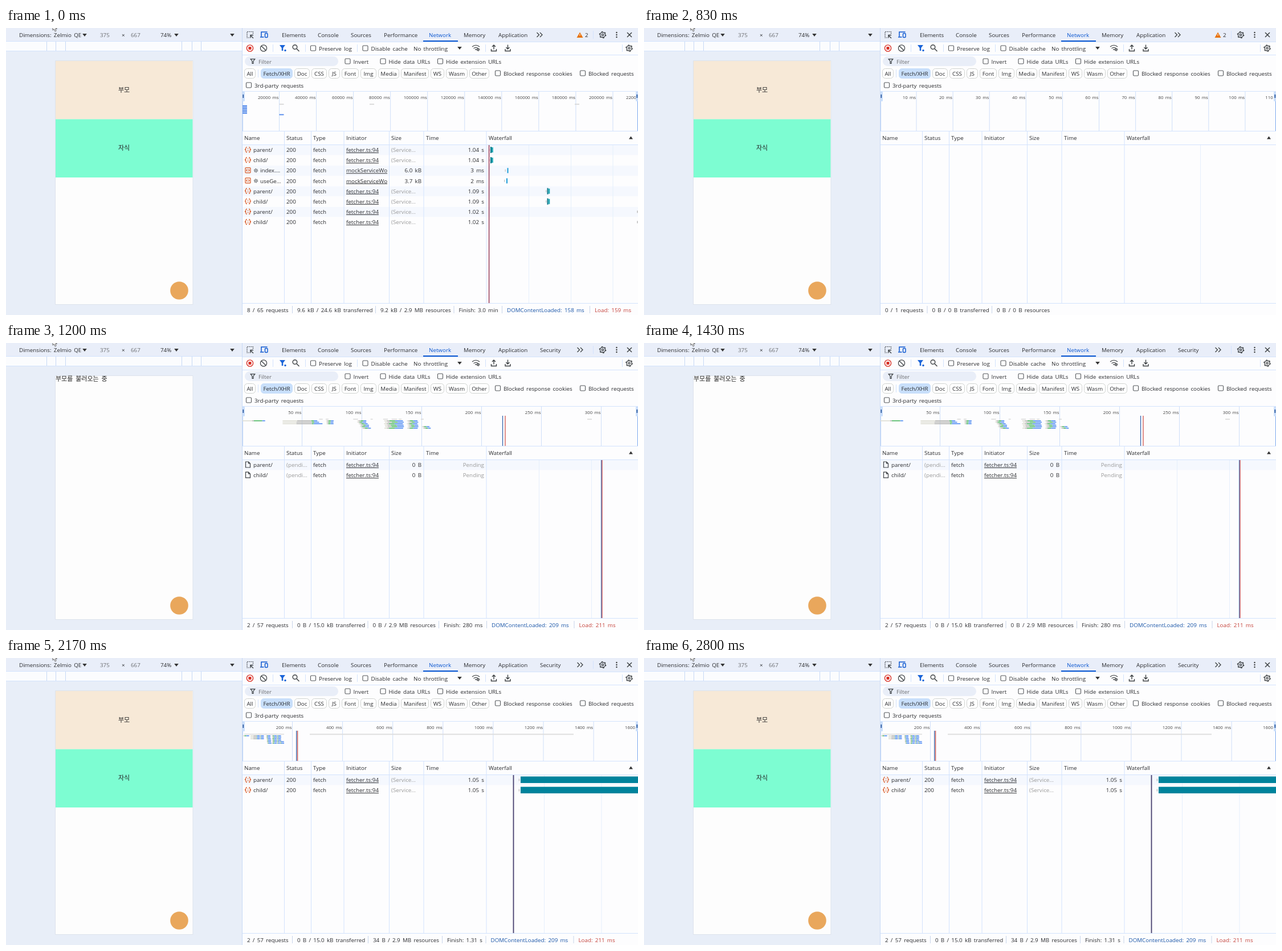
An HTML page for the animation above (2.87 s loop, 1109 by 505 pixels).

```html
<!DOCTYPE html>
<html lang="ko">
<head>
<meta charset="utf-8">
<title>Network panel reload</title>
<style>
  html, body { margin: 0; width: 100%; height: 100%; overflow: hidden; background: #fdfdfe; }
  svg { display: block; }
  text { font: 9.8px "Open Sans", "Noto Sans CJK KR", "Noto Sans CJK", sans-serif; word-spacing: 1.7px; fill: #2b2c2f; white-space: pre; }
  .ko { font: 11px "Noto Sans CJK KR", "Noto Sans CJK", sans-serif; fill: #222; }
  .tick { font-size: 7.8px; word-spacing: 1.3px; fill: #444; }
  .dim { fill: #9a9a9a; }
  .mid { fill: #6b6d70; }
  .blue { fill: #0b57d0; }
  .dcl { fill: #1a56a8; }
  .load { fill: #c5423a; }
  .link { text-decoration: underline; }
  .ic { fill: none; stroke: #3c4043; stroke-width: 1.2; }
</style>
</head>
<body>
<svg id="stage" width="1109" height="505" viewBox="0 0 1109 505"></svg>
<script>
const LOOP = 2870;
const EDGE = '#d3e3fd', BAR = '#e9eef9', TEAL = '#00839c';

const rect = (x, y, w, h, fill, extra = '') =>
  `<rect x="${x}" y="${y}" width="${w}" height="${h}" fill="${fill}" ${extra}/>`;
const vline = (x, y1, y2, color = EDGE, w = 1) => rect(x - w / 2, y1, w, y2 - y1, color);
const hline = (x1, x2, y, color = EDGE) => rect(x1, y, x2 - x1, 1, color);
// y is the middle of the text line
const text = (x, y, s, cls = '', extra = '') =>
  `<text x="${x}" y="${y + 3.6}" class="${cls}" ${extra}>${s}</text>`;
const endText = (x, y, s, cls) => text(x, y, s, cls, 'text-anchor="end"');
const midText = (x, y, s, cls) => text(x, y, s, cls, 'text-anchor="middle"');
const path = (d, extra = '') => `<path class="ic" d="${d}" ${extra}/>`;
const solid = (d, fill = '#333') => `<path d="${d}" fill="${fill}"/>`;
const caret = (x, y) => solid(`M${x - 3.8} ${y - 2.5}h7.6l-3.8 5z`);
const each = (list, fn) => list.map(fn).join('');

function check(x, y, label) {
  return rect(x - 4.5, y - 4.5, 9, 9, '#fff', 'rx="1.5" stroke="#55585c" stroke-width="1.1"') +
    text(x + 10, y + .5, label);
}

function gear(x, y, r, w = 1.3) {
  return `<g class="ic" style="stroke-width:${w}">
    <circle cx="${x}" cy="${y}" r="${r * .75}"/><circle cx="${x}" cy="${y}" r="${r * .28}"/>
    <circle cx="${x}" cy="${y}" r="${r * .95}" stroke-dasharray="${r * .4} ${r * .595}"/></g>`;
}

const funnel = (x, y, r) => `M${x - r} ${y - r}h${2 * r}l${-r * .75} ${r}v${r}h${-r * .5}v${-r}z`;

function devicePane() {
  return rect(0, 0, 414, 505, '#e8eef8') + rect(0, 0, 414, 23, BAR) +
    rect(0, 23, 414, 17, '#fbfcfe') + hline(0, 414, 23) + hline(0, 414, 40) +
    each([71.5, 87.5, 104.5, 308.5, 326.5, 342.5], x => vline(x, 24, 40, '#c6d8f5')) +
    text(23, 12.5, 'Dimensions: Zelmio QE') + caret(138, 12.5) +
    text(165, 12.5, '375', 'mid') + text(203, 12.5, '×') + text(219, 12.5, '667', 'mid') +
    text(271, 12.5, '74%') + caret(299, 12.5) + caret(397, 12.5) +
    '<path d="M82 -6V4l2.3-2 1.8 4 2-1-1.8-3.600h3.200z" fill="#fff" stroke="#555" stroke-width=".9"/>' +
    rect(86, 57, 242.5, 430, '#dde3ec', 'rx="1"') + rect(87, 58, 240.5, 428, '#fdfdfd');
}

function page(loading) {
  if (loading) return text(87, 63.1, '부모를 불러오는 중', 'ko');
  return rect(87, 58, 240.5, 102.5, '#f7e9d7') + rect(87, 160.5, 240.5, 102.5, '#7dfdd2') +
    midText(207, 109.6, '부모', 'ko') + midText(207, 211.6, '자식', 'ko');
}

function tabs() {
  const names = [[484, 'Elements'], [547, 'Console'], [605, 'Sources'], [663, 'Performance'],
    [742, 'Network'], [803, 'Memory'], [864, 'Application']];
  return rect(414, 0, 695, 24, BAR) + hline(414, 1109, 24) +
    path('M433.500 10V6.500H423V17h4', 'stroke-dasharray="1.8 1.2"') +
    path('M434 18l-5-5m0 4.500v-5h5', 'style="stroke-width:1.4"') +
    path('M448 15V7h10.500M446 16h6.500', 'style="stroke:#0b57d0;stroke-width:1.5"') +
    rect(454.5, 9.5, 4.5, 7, 'none', 'rx="1" stroke="#0b57d0" stroke-width="1.4"') +
    each(names, ([x, s]) => text(x, 12.5, s, s === 'Network' ? 'blue' : '')) +
    rect(732, 22, 61, 2, '#0b57d0') + vline(1030.5, 5, 19) + gear(1047, 12, 6) +
    each([8, 12, 16], y => `<circle cx="1071.500" cy="${y}" r="1.200" fill="#333"/>`) +
    path('M1090 8l8 8m0-8l-8 8', 'style="stroke-width:1.5"');
}

function toolbar() {
  return hline(414, 1109, 47) +
    '<circle cx="428" cy="35.500" r="5.600" fill="none" stroke="#d93025" stroke-width="1.400"/>' +
    rect(425.5, 33, 5, 5, '#d93025', 'rx=".6"') +
    '<circle class="ic" cx="452" cy="35.500" r="5.600"/>' + path('M448 31.500l8 8') +
    vline(468.5, 29, 42) + solid(funnel(485, 35, 5), '#1a64d8') +
    '<circle cx="490" cy="39.500" r="1.700" fill="#1a64d8"/>' +
    '<circle class="ic" cx="507" cy="33.500" r="3.800" style="stroke-width:1.4"/>' +
    path('M510 36.500l4.500 4.500', 'style="stroke-width:1.5"') + vline(525.5, 29, 42) +
    check(539, 35.5, 'Preserve log') + vline(616.5, 29, 42) + check(630.5, 35.5, 'Disable cache') +
    text(715, 36, 'No throttling') + caret(796, 35.5) +
    path('M818 33q6.500-5.500 13 0M820.500 35.800q4-3 8 0M823 38.200q1.500-1 3 0') +
    gear(828.5, 38, 2.6, 1) + vline(841.5, 29, 42) +
    path('M856 37.500V30m-3 3l3-3 3 3M851.500 37v3.500h9V37', 'style="stroke-width:1.4"') +
    path('M880.500 29.500V37m-3-3l3 3 3-3M876 37v3.500h9V37', 'style="stroke-width:1.4"') +
    vline(1081.5, 29, 42) + gear(1093.5, 35.5, 6);
}

function filters() {
  const pills = [[418, 438, 'All'], [447, 503, 'Fetch/XHR'], [506, 533, 'Doc'], [536, 563, 'CSS'],
    [566, 586, 'JS'], [589, 619, 'Font'], [622, 650, 'Img'], [653, 690, 'Media'],
    [693, 742, 'Manifest'], [745, 769, 'WS'], [772, 810, 'Wasm'], [813, 848, 'Other']];
  return rect(419, 50, 164, 17, '#e9eef8', 'rx="8.500"') + path(funnel(433, 58.5, 3.8)) +
    text(443, 59, 'Filter', 'mid') +
    check(599.5, 58.5, 'Invert') + check(661.5, 58.5, 'Hide data URLs') + check(762, 58.5, 'Hide extension URLs') +
    each(pills, ([a, b, s]) => {
      const on = s === 'Fetch/XHR';
      return rect(a + .5, 71.5, b - a - 1, 17, on ? '#c8dffb' : '#fff',
        `rx="5" stroke="${on ? '#c8dffb' : '#d0d3d0'}"`) + midText((a + b) / 2, 80.5, s);
    }) + vline(442.5, 73, 87) +
    check(863, 79.5, 'Blocked response cookies') + check(1012, 79.5, 'Blocked requests') +
    check(426, 100.5, '3rd-party requests') + hline(414, 1109, 111);
}

function table() {
  const heads = [[418, 'Name'], [492, 'Status'], [539, 'Type'], [597, 'Initiator'], [676, 'Size'],
    [737, 'Time'], [847, 'Waterfall']];
  return hline(414, 1109, 181) + hline(414, 1109, 205) + each(heads, ([x, s]) => text(x, 193.5, s)) +
    solid('M1093 195.500h7l-3.500-5z') + hline(414, 1109, 484);
}

const columns = () => each([488.5, 535.5, 593, 672.5, 733, 843], x => vline(x, 181, 484));

function ruler(first, gap, step) {
  let out = '';
  for (let i = 0; first + i * gap < 1135; i++) {
    const x = first + i * gap;
    out += vline(x, 112, 181, '#cfdff8') + endText(x - 1, 121, `${step * (i + 1)} ms`, 'tick');
  }
  const handle = x => rect(x, 112, 5, 17, '#cbdffb', 'rx="1"') + rect(x + 1.5, 117, 1.6, 6, '#1f4f96');
  return `<g clip-path="url(#over)">${out}</g>` + vline(415, 112, 181, '#7ba7ee') +
    vline(1108.5, 112, 181, '#7ba7ee') + handle(414) + handle(1105);
}

// Request strips: start in ms, row, then lengths of waiting, stalled, server and download
function strips() {
  const list = [[.2, 0, 8.3, 1.5, 7, 2.4], [34, 0, 12.2, 11.8, 2, 3], [34, 1, 11.5, 13, 2, 4],
    [34, 2, 11.5, 13, 1.4, 7.4]];
  const clusters = [[70, 6, 0, 3, .5], [96, 7.6, 0, 6, .8], [119, 16, 0, 6, .1],
    [138, 9, 0, 6, .1], [150.5, 6.5, 4, 2, .2]];
  for (const [start, len, row, n, shift] of clusters)
    for (let i = 0; i < n; i++) {
      const j = Math.sin(start + i * 2.3) * .06;
      list.push([start + i * shift + j * 8, row + i, len * .14, len * (.16 + j), len * .3, len * (.38 - j)]);
    }
  return list;
}

function requests(scale) {
  const colors = ['#e0e0d6', '#b9b9b7', '#55bb69', '#5b93f3'];
  const tops = [[64.5, 3], [70, 2.4], [93, 4], [107.5, 1.8], [118, 4], [125, 4.6], [131, 2.4], [149.5, 2.4]];
  return each(tops, ([a, w]) => rect(414 + a * scale, 133.3, Math.max(3, w * scale), 1.6, '#dcdcdc')) +
    each(strips(), ([a, row, ...parts]) => {
      let x = 414 + a * scale;
      return each(parts, (w, i) => {
        const px = Math.max(i === 3 ? 5 : .8, w * scale), at = x;
        x += px;
        return rect(at, 136 + row * 2.6, px, 1.7, colors[i]);
      });
    });
}

const marks = (blue, red) => vline(blue, 128, 181, '#3566ae', 1.3) + vline(red, 128, 181, '#d0554d', 1.3);
const grid = xs => each(xs, x => vline(x, 205, 484, '#e6effc'));

function fileIcon(y, kind) {
  if (kind === 'doc') return path(`M420.500 ${y - 5}h5l3 3v7h-8zm5 0v3h3`);
  const style = 'style="stroke:#d8541f;stroke-width:1.2"';
  if (kind === 'json') return path(`M423 ${y - 4.5}q-2 0-2 2t-2 2.500q2 0 2 2.500t2 2M426 ${y - 4.5}q2 0 2 2t2 2.500q-2 0-2 2.500t-2 2`, style) +
    rect(424, y - 2.4, 1.2, 1.5, '#d8541f') + rect(424, y + .8, 1.2, 2, '#d8541f');
  return rect(420, y - 4.5, 9, 9, 'none', 'rx="1" stroke="#d8541f" stroke-width="1.200"') +
    path(`M423.500 ${y - 2}l-1.500 2 1.500 2m2-4l1.500 2-1.500 2`, style);
}

// Each row: name, time, and for scripts a size
function rows(list) {
  return each(list, ([name, time, size], i) => {
    const y = 214.5 + i * 18.15, wait = time === 'Pending', script = size && !wait;
    return (i % 2 ? '' : rect(415, y - 8.5, 694, 17.5, '#f5f8fe')) +
      fileIcon(y - .5, wait ? 'doc' : script ? 'js' : 'json') +
      (script ? gear(438.5, y, 3.4, .7) : '') + text(script ? 446 : 434, y, name) +
      text(492, y, wait ? '(pendi…' : '200', wait ? 'dim' : '') + text(539, y, 'fetch') +
      text(597, y, script ? 'mockServiceWo' : 'fetcher.ts:94', 'link') +
      (size ? endText(729, y, size) : text(676, y, '(Service…', 'dim')) +
      endText(839, y, time, wait ? 'dim' : '');
  });
}

const pair = time => [['parent/', time], ['child/', time]];

function footer(items) {
  return each(items, ([x, s, cls], i) =>
    (i ? vline(x - 8.5, 489, 502, '#c9d6ea') : '') + text(x, 496.5, s, cls));
}

const timing = (dcl, a, load, b) => [[dcl, `DOMContentLoaded: ${a} ms`, 'dcl'], [load, `Load: ${b} ms`, 'load']];

const more = x => path(`M${x} 8l4 4-4 4m5.500-8l4 4-4 4`, 'style="stroke-width:1.3"');
const shortTabs = more(931.5) + solid('M1007 7.500l5.500 9.500h-11z', '#e8710a') +
  rect(1006.5, 10.5, 1, 3.2, '#fff') + text(1016, 12.5, '2');
const longTabs = text(937, 12.5, 'Security') + more(1002.5);

function finished() {
  const y = i => 214.5 + i * 18.15;
  const chip = (x, i) => rect(x - 2.5, y(i) - 2, 1.5, 4, '#ccc') + rect(x, y(i) - 5.5, 2, 11, '#0b7285') +
    rect(x + 2, y(i) - 4.5, 2.8, 9, '#24a9b5');
  const thin = (x, i) => rect(x - 4, y(i) - 2, 1.5, 4, '#ccc') + rect(x, y(i) - 4.5, 2, 9, '#1d9bd8');
  return shortTabs + ruler(479.5, 65.05, 20000) +
    each([0, 1, 2, 3, 4, 5], i => rect(415, 136 + i * 2.6, 8, 1.8, '#4e86ea')) +
    each([479.5, 638, 998], x => rect(x, 133.3, 8, 1.8, '#d8d8d8')) + rect(479.5, 151.6, 8, 1.8, '#4e86ea') +
    rows([...pair('1.04 s'), ['index.…', '3 ms', '6.0 kB'], ['useGe…', '2 ms', '3.7 kB'],
      ...pair('1.09 s'), ...pair('1.02 s')]) + grid([917.5, 991.5, 1065]) +
    chip(850, 0) + chip(850, 1) + thin(879.5, 2) + thin(878, 3) + chip(949.5, 4) + chip(949.5, 5) +
    rect(1107, y(6) - 2, 2, 4, '#ccc') + rect(1107, y(7) - 2, 2, 4, '#ccc') +
    vline(847.6, 205, 484, '#973b57', 1.5) +
    footer([[423, '8 / 65 requests'], [511, '9.6 kB / 24.6 kB transferred'], [657, '9.2 kB / 2.9 MB resources'],
      [794.5, 'Finish: 3.0 min'], ...timing(879, 158, 1033, 159)]);
}

function cleared() {
  return shortTabs + ruler(478, 64.1, 10) + grid([976.5]) +
    footer([[423, '0 / 1 requests'], [505.5, '0 B / 0 B transferred'], [619, '0 B / 0 B resources']]);
}

function loadingFiles() {
  return longTabs + ruler(496, 82.1, 20) + requests(4.1) + grid([964.5, 1025.5, 1086]) +
    vline(1106.5, 205, 484, '#4f84c4', 1.3) +
    footer([[423, '0 / 54 requests'], [511, '0 B / 15.0 kB transferred'], [643.5, '0 B / 2.5 MB resources'],
      [768, 'Finish: 147 ms'], ...timing(852, 209, 1005.5, 211)]);
}

function pending() {
  return longTabs + ruler(519.5, 105, 50) + requests(2.1) + rect(1020, 133.3, 8, 1.8, '#dcdcdc') +
    marks(871.5, 876) + rows([['parent/', 'Pending', '0 B'], ['child/', 'Pending', '0 B']]) +
    grid([935.5, 1027.5]) + vline(1044.5, 205, 484, '#3566ae') + vline(1046, 205, 484, '#b9474f', 1.3) +
    footer([[423, '2 / 57 requests'], [511, '0 B / 15.0 kB transferred'], [643.5, '0 B / 2.9 MB resources'],
      [768, 'Finish: 280 ms'], ...timing(852, 209, 1005.5, 211)]);
}

function loaded() {
  return longTabs + ruler(502.5, 88.1, 200) + requests(.4405) + rect(418, 133.3, 70, 1.8, '#e2e2e2') +
    rect(533, 133.3, 463, 2, '#dfdfdf') + marks(509.7, 511.6) + rows(pair('1.05 s')) + grid([944.5, 1045]) +
    each([0, 1], i => rect(899.5, 212.5 + i * 18.15, 2, 4, '#ccc') + rect(903, 208.5 + i * 18.15, 206, 11.5, TEAL)) +
    vline(890.5, 205, 484, '#47406e', 1.8) +
    footer([[423, '2 / 57 requests'], [511, '0 B / 15.0 kB transferred'], [644, '34 B / 2.9 MB resources'],
      [774, 'Finish: 1.31 s'], ...timing(850.5, 209, 1004.5, 211)]);
}

const scenes = [
  [0, finished], [800, cleared], [1070, loadingFiles], [1170, pending], [2170, loaded]
];

const stage = document.getElementById('stage');
stage.innerHTML =
  `<defs><clipPath id="over">${rect(415, 111, 690, 70, '#000')}</clipPath></defs>` +
  rect(0, 0, 1109, 505, '#fdfdfe') + devicePane() + tabs() + toolbar() + filters() +
  each(scenes, ([, draw]) =>
    `<g class="scene" visibility="hidden">${page(draw === pending)}${draw()}${columns()}</g>`) +
  table() + vline(414.5, 0, 505, '#c9daf5') +
  '<circle cx="304" cy="462" r="15.800" fill="#e9a75c"/>';

const groups = [...stage.querySelectorAll('.scene')];
const start = performance.now();
let shown = -1;

function frame() {
  const t = (performance.now() - start) % LOOP;
  const now = scenes.findLastIndex(([from]) => t >= from);
  if (now !== shown) {
    groups.forEach((g, i) => g.setAttribute('visibility', i === now ? 'visible' : 'hidden'));
    shown = now;
  }
  requestAnimationFrame(frame);
}
frame();
</script>
</body>
</html>
```
